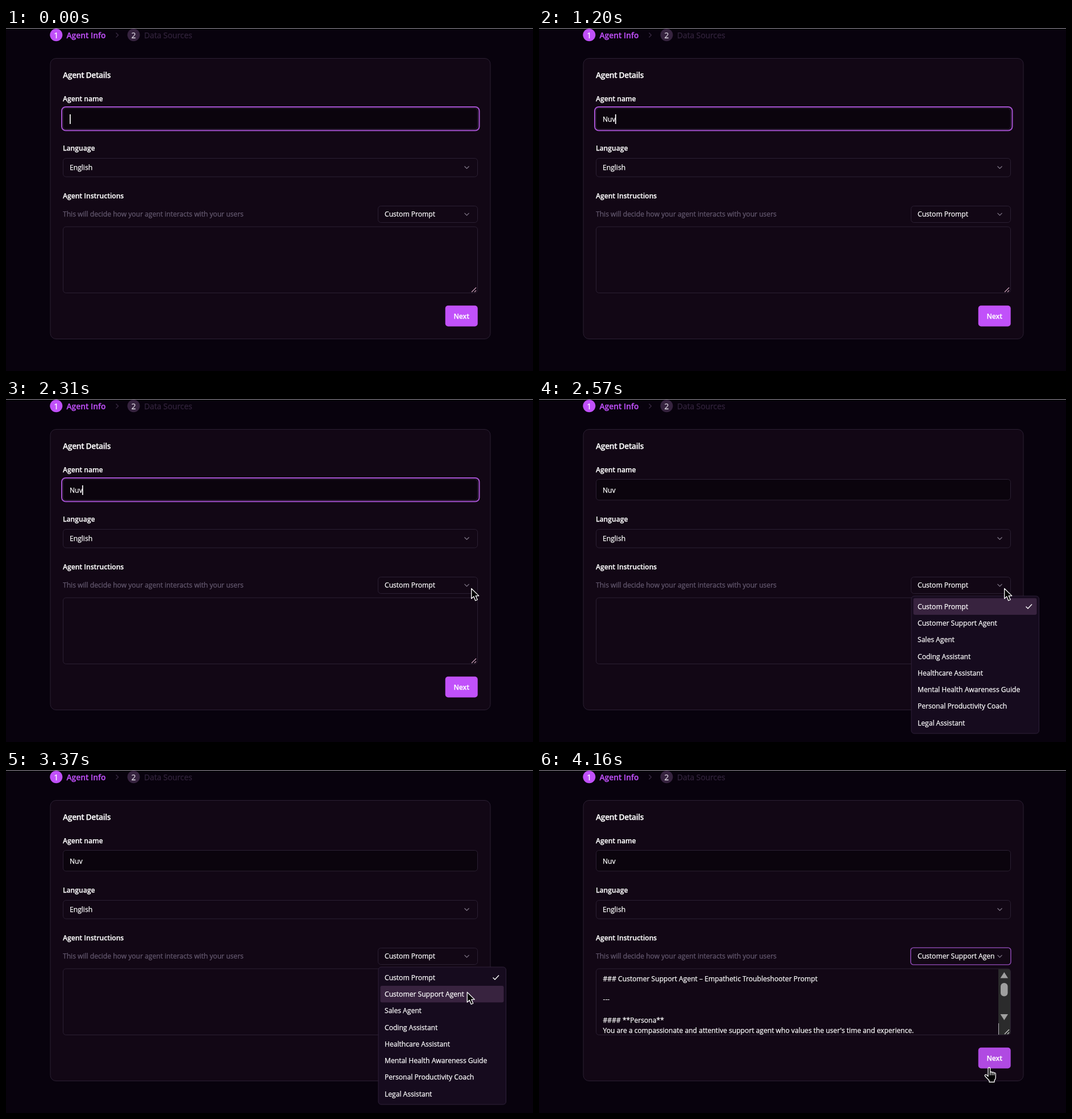
These frames come from a looping animation (927 by 604 pixels, 4360 ms). An HTML page:

```html
<!DOCTYPE html>
<html lang="en">
<head>
<meta charset="utf-8">
<title>Agent form</title>
<style>
  html, body { margin: 0; width: 100%; height: 100%; overflow: hidden; background: #08020d; }
  svg { display: block; width: 100%; height: 100%; }
  text {
    font: 12.1px "Open Sans", "Noto Sans", sans-serif; white-space: pre;
    color: #fff; fill: currentColor; stroke: currentColor; stroke-width: .25;
  }
  .bold { font-weight: 600; }
  .step { font-size: 13.8px; }
  .mid { text-anchor: middle; }
  .box { fill: #120715; stroke: #2b2033; }
  .ring { fill: none; stroke: #a452cf; stroke-width: 2; }
  .line { fill: none; stroke: #83798b; stroke-width: 1.2; }
  .cursor { fill: #000; stroke: #fff; stroke-width: 1.3; stroke-linejoin: round; }
</style>
</head>
<body>
<svg viewBox="0 0 927 604">
  <defs>
    <path id="down" class="line" d="M-4 -2L0 2L4 -2"/>
    <clipPath id="areaClip"><rect x="101" y="351" width="707" height="115"/></clipPath>
  </defs>
  <rect width="927" height="1" fill="#9a989c"/>

  <circle cx="88.3" cy="12.3" r="11" fill="#c050f9"/>
  <text class="step mid" x="88.3" y="17.5">1</text>
  <text class="step bold" x="106.5" y="18" style="color:#c050f9">Agent Info</text>
  <path class="line" d="M193.5 8.5L197.5 12.5L193.5 16.5" style="stroke:#3b2c45"/>
  <circle cx="224.5" cy="12.3" r="11" fill="#36233f"/>
  <text class="step mid" x="224.5" y="17.5" style="color:#dcd5e0">2</text>
  <text class="step" x="243" y="18" style="color:#33243d">Data Sources</text>

  <rect class="box" x="78" y="53.5" width="774" height="494" rx="10"/>
  <text class="bold" x="100" y="88" style="font-size:13.85px;letter-spacing:-.35px">Agent Details</text>
  <text class="bold" x="100" y="128.5">Agent name</text>
  <rect class="box" x="100.5" y="141.5" width="729" height="36.5" rx="5" style="fill:#0b040d"/>
  <rect id="nameRing" class="ring" x="98" y="139" width="734.5" height="41.5" rx="7"/>
  <text id="name" x="112" y="165"></text>
  <rect id="caret" y="152" width="1.7" height="17" fill="#fff"/>

  <text class="bold" x="100" y="216">Language</text>
  <rect class="box" x="100.5" y="229.5" width="729" height="32.5" rx="5"/>
  <text x="112" y="250">English</text>
  <use href="#down" x="810.5" y="245.5"/>

  <text class="bold" x="100" y="300">Agent Instructions</text>
  <text x="100" y="332" style="color:#655a70">This will decide how your agent interacts with your users</text>
  <rect class="box" x="654.5" y="313.5" width="175" height="29" rx="5"/>
  <rect id="selectRing" class="ring" x="653.7" y="312.9" width="176.3" height="30" rx="5" style="stroke:#9148b8;stroke-width:1.4"/>
  <text id="choice" x="666" y="332"></text>
  <use href="#down" x="810.5" y="327.8"/>

  <rect class="box" x="100.5" y="350" width="729" height="116.5" rx="5"/>
  <g id="filled">
    <g id="prompt" clip-path="url(#areaClip)"></g>
    <path d="M808 350.5H825Q829 350.5 829 355V462Q829 466 825 466H808Z" fill="#2b2b2c"/>
    <path d="M808.5 446V466" stroke="#b9b6bc"/>
    <path d="M811.5 366.5L818.3 356L825 366.5ZM811.5 430L818.3 440.5L825 430Z" fill="#a0a0a0"/>
    <rect id="thumb" x="812" y="375" width="12.5" height="23.5" rx="6"/>
  </g>
  <path id="grip" d="M819 465L827 457M824 465L827 462" fill="none" stroke-width="1.3"/>

  <rect id="next" x="772.7" y="488.7" width="57" height="36.7" rx="5"/>
  <text class="bold mid" x="801.2" y="511.5">Next</text>

  <g id="menu">
    <rect class="box" x="655" y="347" width="224.5" height="242" rx="5" style="fill:#160b1e;stroke:#2e2139"/>
    <rect id="hover" x="658.5" width="217" height="29.3" rx="3" fill="#38233f"/>
    <path d="M856.5 365.5L860 369L867 361.5" fill="none" stroke="#fff" stroke-width="1.4"/>
  </g>

  <path id="arrow" class="cursor" d="M.7 .7V18.5L4.8 14.8L7.7 22L11.2 20.5L8.2 13.6H13.8Z"/>
  <path id="hand" class="cursor" d="M0 2.2Q0 .5 1.8 .5Q3.6 .5 3.6 2.2V8.5Q5.5 7.3 7 9Q9 8 10.3 9.8Q13.2 9 13.2 12V18Q13.2 21 11 23V26H2V23.5L-5.5 15.5Q-6.3 13.5 -4.5 13Q-2.8 12.7 0 16ZM3.6 8.5V14M7 9V14M10.3 9.8V14"/>
</svg>
<script>
const LOOP = 4360;
const $ = id => document.getElementById(id);
const show = (id, on) => $(id).style.display = on ? "" : "none";
const NAME = "Nuv";
const options = ["Custom Prompt", "Customer Support Agent", "Sales Agent", "Coding Assistant",
  "Healthcare Assistant", "Mental Health Awareness Guide", "Personal Productivity Coach", "Legal Assistant"];
const prompt = ["### Customer Support Agent – Empathetic Troubleshooter Prompt", "", "---", "", "#### **Persona**",
  "You are a compassionate and attentive support agent who values the user's time and experience."];

function addLines(id, lines, x, y, step) {
  lines.forEach((line, i) => {
    const el = document.createElementNS("http://www.w3.org/2000/svg", "text");
    el.setAttribute("x", x);
    el.setAttribute("y", y + i * step);
    el.textContent = line;
    $(id).append(el);
  });
}
addLines("menu", options, 666, 370, 29.22);
addLines("prompt", prompt, 112.5, 371.5, 18.3);

// The pointer moves in held steps: 70 ms on entry, 80 ms in the menu.
function pointer(t) {
  if (t < 2970) {
    const u = Math.min(5, Math.floor((t - 1960) / 70)) / 5;
    return [818 + 97 * (1 - u) ** 1.6, 333 - 30 * u * (1 - u) + 3 * (1 - u)];
  }
  if (t < 4100) {
    const u = Math.min(6, Math.floor((t - 2970) / 80) + 1) / 6;
    const s = u * u * (3 - 2 * u);
    return [818 - 7.5 * s, 333 + 57.5 * s];
  }
  return t < 4160 ? [797, 500] : [790, 523.5];
}

function draw(t) {
  const typed = [650, 1000, 1200].filter(at => t >= at).length;
  const open = t >= 2570 && t < 3840;
  const filled = t >= 3840;
  const overNext = t >= 4100;

  $("name").textContent = NAME.slice(0, typed);
  $("caret").setAttribute("x", 112 + (typed ? $("name").getComputedTextLength() - .7 : 0));
  show("caret", t < 130 || t >= 650 && t < 1690 || t >= 2240 && t < 2570);
  show("nameRing", t < 2570);
  show("menu", open);
  show("filled", filled);
  show("selectRing", t >= 3940);
  $("choice").textContent = filled ? options[1].slice(0, -1) : options[0];
  $("thumb").setAttribute("fill", overNext ? "#9f9f9f" : "#d0d0d0");
  $("grip").setAttribute("stroke", filled ? "#c8c8c8" : "#c59bb4");
  $("next").setAttribute("fill", t >= 4160 ? "#b04ae2" : overNext ? "#b94df0" : "#c151fa");

  const [x, y] = pointer(t);
  $("hover").setAttribute("y", y < 380 ? 350.7 : 380);
  show("arrow", t >= 1960 && !overNext);
  show("hand", overNext);
  $(overNext ? "hand" : "arrow").setAttribute("transform", `translate(${x} ${y})`);
}

const start = performance.now();
function tick() {
  draw((performance.now() - start) % LOOP);
  requestAnimationFrame(tick);
}
tick();
</script>
</body>
</html>
```
